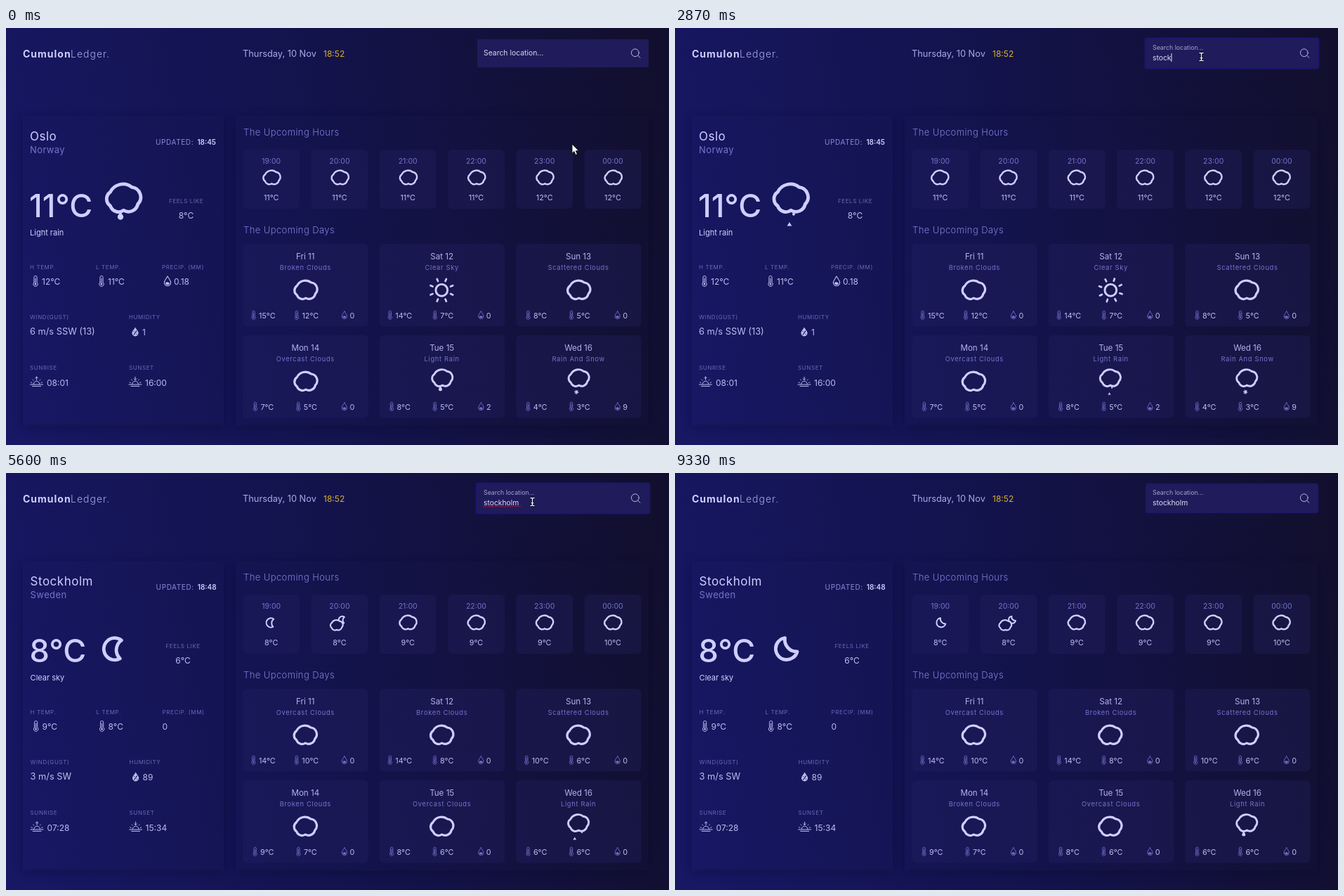
These frames come from a looping animation (944 px wide and 593 px high, 9.39 s). An HTML page:

```html
<!DOCTYPE html>
<html lang="en">
<head>
<meta charset="utf-8">
<title>Weather dashboard</title>
<style>
html, body { margin: 0; width: 100%; height: 100%; overflow: hidden; background: #13134c; }
svg { display: block; width: 944px; height: 593px; font-family: Inter, "Open Sans", sans-serif; }
text { white-space: pre; }
.ln { fill: none; stroke-linecap: round; stroke-linejoin: round; }
</style>
</head>
<body>
<svg id="stage" viewBox="0 0 944 593">
  <defs>
    <linearGradient id="bg" gradientUnits="userSpaceOnUse" x1="0" y1="350" x2="944" y2="190">
      <stop offset="0" stop-color="#171763"/>
      <stop offset=".5" stop-color="#13134c"/>
      <stop offset="1" stop-color="#120f2e"/>
    </linearGradient>
    <filter id="soft" x="-10%" y="-10%" width="120%" height="120%"><feGaussianBlur stdDeviation="8"/></filter>
    <filter id="glow" x="-5%" y="-20%" width="110%" height="140%"><feGaussianBlur stdDeviation=".7"/></filter>
    <clipPath id="fall"><rect x="-30" y="-30" width="60" height="56"/></clipPath>
  </defs>
</svg>
<script>
const LOOP = 9390, SWAP = 4300;
const BRIGHT = '#cfceff', VALUE = '#bdbcf0', MUTED = '#7572cd', LABEL = '#6a68ba';
const CLOUD = 'M-12.6-6.2A13.5 13.5 0 0 1 7.8-10.8A9.5 9.5 0 0 1 13.5 5.3A9 9 0 0 1 0 11.2A8.3 8.3 0 0 1-12.6 7A8 8 0 0 1-12.6-6.2Z';
const MOON = 'M-2-15.5A15.6 15.6 0 1 0 15.5 4A17 17 0 0 1-2-15.5Z';
const DROP = 'M0-8C1-5.5 2.8-4 2.8-2.6A2.8 2.8 0 0 1-2.8-2.6C-2.8-4-1-5.5 0-8Z';
const root = document.getElementById('stage');
const anims = [];

const clamp = v => Math.max(0, Math.min(1, v));
const ease = v => { v = clamp(v); return v * v * (3 - 2 * v); };
const mix = (a, b, k) => a + (b - a) * k;
const frac = v => v - Math.floor(v);
const put = (node, attrs) => { for (const k in attrs) node.setAttribute(k, attrs[k]); };

function el(tag, attrs, parent = root) {
  const node = document.createElementNS('http://www.w3.org/2000/svg', tag);
  put(node, attrs);
  parent.appendChild(node);
  return node;
}
function label(parent, x, y, str, size, fill, more = {}) {
  const node = el('text', { x, y, 'font-size': size, fill, ...more }, parent);
  node.textContent = str;
  return node;
}
const group = (parent, x, y, s = 1) => el('g', { transform: `translate(${x} ${y}) scale(${s})` }, parent);
const line = (parent, d, stroke, w, more = {}) =>
  el('path', { d, class: 'ln', stroke, 'stroke-width': w, ...more }, parent);
const MID = { 'text-anchor': 'middle' };

// Small fixed icons
function thermo(parent, x, y, s, color) {
  const g = group(parent, x, y, s);
  line(g, 'M-2.1 1.8V-5.4A2.1 2.1 0 0 1 2.1-5.4V1.8A3.2 3.2 0 1 1-2.1 1.8Z', color, 1);
  line(g, 'M0-4V4', color, 1.1);
  el('circle', { cy: 4.2, r: 1.3, fill: color }, g);
}
function water(parent, x, y, s, color) {
  const g = group(parent, x, y, s);
  line(g, 'M0-6.6C1.5-3.6 4.4-1 4.4 2A4.4 4.4 0 0 1-4.4 2C-4.4-1-1.5-3.6 0-6.6Z', color, 1.1);
  el('path', { d: 'M-2.8 2Q0 0 2.8 2.6A2.8 2.8 0 0 1-2.8 2Z', fill: color }, g);
}
function humid(parent, x, y) {
  const g = group(parent, x, y);
  el('path', { d: 'M0-6.5C1.4-3.6 4.6-1 4.6 1.8A4.6 4.6 0 0 1-4.6 1.8C-4.6-1-1.4-3.6 0-6.5Z', fill: VALUE }, g);
  line(g, 'M1.8-1.2L-1.8 4M-1.9-.4h.1M1.9 3.2h.1', '#171757', 1.2);
}
function horizon(parent, x, y, dir) {
  const g = group(parent, x, y);
  line(g, 'M-9 4H9M-6 6.4H6M-4.4 3.6A4.4 4.4 0 0 1 4.4 3.6M-8 .8L-6.6 1.4M8 .8L6.6 1.4M-5.4-3L-4.4-2M5.4-3L4.4-2M0-6.8V-2.6', VALUE, 1);
  line(g, dir > 0 ? 'M-1.8-5.2L0-7L1.8-5.2' : 'M-1.8-4.2L0-2.4L1.8-4.2', VALUE, 1);
}

// Moving weather icons; each takes a parent, centre, scale and city index
const sway = (t, city) => .95 * Math.cos(2 * Math.PI * (t - city * 6470) / 4470);

function cloud(parent, x, y, s, city, fill = 'none', w = 3.2) {
  const g = group(parent, x, y, s);
  const path = line(g, CLOUD, BRIGHT, w, { style: `fill:${fill}` });
  anims.push(t => put(path, { transform: `translate(${sway(t, city)} 0)` }));
  return g;
}
function rain(parent, x, y, s, city) {
  const g = cloud(parent, x, y, s, city);
  const wrap = el('g', { 'clip-path': 'url(#fall)' }, g);
  const xs = city ? [-5.5, 6] : [2, -2];
  xs.forEach((dx, i) => {
    const drop = el('path', { d: DROP, fill: BRIGHT }, wrap);
    anims.push(t => {
      const p = frac((city ? .65 + (t - 6470) / 658 : .48 + t / 658) + (i ? 0 : .5));
      const k = clamp((p - .24) / .22);
      put(drop, { transform: `translate(${dx} ${6.5 + 28 * p}) scale(${k})` });
    });
  });
}
function snow(parent, x, y, s, city) {
  const g = cloud(parent, x, y, s, city);
  const wrap = el('g', { 'clip-path': 'url(#fall)' }, g);
  [-2.8, 4].forEach((dx, i) => {
    const flake = line(wrap, 'M-2.8 0H2.8M-1.4-2.4L1.4 2.4M1.4-2.4L-1.4 2.4', BRIGHT, 1.5);
    anims.push(t => {
      const p = frac(.75 + t / 2900 + i / 2);
      put(flake, { transform: `translate(${dx} ${9 + 17.3 * p}) rotate(${p * 180}) scale(${clamp((p - .2) / .25)})` });
    });
  });
}
function sun(parent, x, y, s) {
  const g = group(parent, x, y, s);
  el('circle', { r: 8.4, class: 'ln', stroke: BRIGHT, 'stroke-width': 2.9 }, g);
  const rays = el('g', {}, g);
  for (let i = 0; i < 8; i++) line(rays, 'M13.8 0H17.2', BRIGHT, 2.7, { transform: `rotate(${22.5 + 45 * i})` });
  anims.push(t => put(rays, { transform: `rotate(${t * .03})` }));
}
function moon(parent, x, y, s, city, w = 4.8) {
  const path = line(group(parent, x, y, s), MOON, BRIGHT, w);
  anims.push(t => {
    const k = (9330 - t) / 4660;
    put(path, { transform: `translate(${2.5 - 5 * k} 0) rotate(${58 * k})` });
  });
}
function cloudMoon(parent, x, y, s, city) {
  moon(parent, x + 6.4, y - 4, .32, city, 6.4);
  cloud(parent, x - 2.2, y + 3.8, .55, city, '#17174f', 3.9);
}
const ICONS = { cloud, rain, snow, sun, moon, cloudMoon };

// Page frame
el('rect', { width: 944, height: 593, fill: 'url(#bg)' });
for (const [x, w] of [[24, 286], [327, 588]]) {
  el('rect', { x, y: 128, width: w, height: 438, fill: '#08082a', opacity: .38, filter: 'url(#soft)' });
  el('rect', { x, y: 125, width: w, height: 438, rx: 2, fill: 'url(#bg)' });
}
const card = (x, y, w, h) => el('rect', { x, y, width: w, height: h, rx: 6, fill: '#242260', opacity: .34 });
const hourX = i => 337.3 + 97.25 * i, dayX = i => 337.3 + 194.4 * i;
for (let i = 0; i < 6; i++) {
  card(hourX(i), 173, 81, 84);
  card(dayX(i % 3), i < 3 ? 307 : 437, 178.6, 117.5);
}
label(root, 24, 42, 'Cumulon', 14, BRIGHT, { 'font-weight': 700, 'letter-spacing': 1 });
label(root, 92, 42, 'Ledger.', 14, '#a9a7ea', { 'font-weight': 300, 'letter-spacing': 1 });
label(root, 337, 41.3, 'Thursday, 10 Nov', 12.8, '#aaa8ea');
label(root, 452, 41.3, '18:52', 12, '#d6b12d');
const HEAD = { 'font-weight': 300, 'letter-spacing': .4 };
label(root, 338, 153, 'The Upcoming Hours', 13, '#7f7cd9', HEAD);
label(root, 338, 292, 'The Upcoming Days', 13, '#7f7cd9', HEAD);

// City data
const cities = [
  {
    name: 'Oslo', land: 'Norway', at: '18:45', temp: '11°C', icon: ['rain', 166, 242.5, 1.5],
    feels: '8°C', feelX: 256.5, sky: 'Light rain', hi: '12°C', lo: '11°C', wet: '0.18',
    wind: '6 m/s SSW (13)', hum: '1', rise: '08:01', set: '16:00',
    hours: ['11°C cloud', '11°C cloud', '11°C cloud', '11°C cloud', '12°C cloud', '12°C cloud'],
    days: ['Broken Clouds|cloud|15|12|0', 'Clear Sky|sun|14|7|0', 'Scattered Clouds|cloud|8|5|0',
      'Overcast Clouds|cloud|7|5|0', 'Light Rain|rain|8|5|2', 'Rain And Snow|snow|4|3|9']
  },
  {
    name: 'Stockholm', land: 'Sweden', at: '18:48', temp: '8°C', icon: ['moon', 156, 250, 1],
    feels: '6°C', feelX: 251.5, sky: 'Clear sky', hi: '9°C', lo: '8°C', wet: '0',
    wind: '3 m/s SW', hum: '89', rise: '07:28', set: '15:34',
    hours: ['8°C moon', '8°C cloudMoon', '9°C cloud', '9°C cloud', '9°C cloud', '10°C cloud'],
    days: ['Overcast Clouds|cloud|14|10|0', 'Broken Clouds|cloud|14|8|0', 'Scattered Clouds|cloud|10|6|0',
      'Broken Clouds|cloud|9|7|0', 'Overcast Clouds|cloud|8|6|0', 'Light Rain|rain|6|6|0']
  }
];
const dayNames = ['Fri 11', 'Sat 12', 'Sun 13', 'Mon 14', 'Tue 15', 'Wed 16'];

// Icon and number, centred together on cx
function pair(parent, cx, y, str, icon) {
  const g = el('g', {}, parent);
  icon(g, 3.5, y - 4.4, .82, MUTED);
  const w = label(g, 11, y, str, 10.8, VALUE).getComputedTextLength();
  put(g, { transform: `translate(${cx - (11 + w) / 2} 0)` });
}
function buildCity(c, city) {
  const g = el('g', {});
  const left = group(g, city * .6, 0);
  const cap = (x, y, s, more) => label(left, x, y, s, 8, LABEL, { 'letter-spacing': .6, ...more });
  const val = (x, y, s, size = 12) => label(left, x, y, s, size, VALUE);
  label(left, 34, 160, c.name, 17, BRIGHT, { 'letter-spacing': .5 });
  label(left, 34, 178, c.land, 13, MUTED, { 'letter-spacing': .4 });
  label(left, 213, 165.5, 'UPDATED:', 10, '#8d8ad8', { 'letter-spacing': .6 });
  label(left, 299, 165.5, c.at, 10, BRIGHT, { 'font-weight': 600, 'text-anchor': 'end' });
  label(left, 33, 269, c.temp, 45, BRIGHT, { 'font-weight': 500 });
  cap(c.feelX, 249, 'FEELS LIKE', MID);
  label(left, c.feelX, 271, c.feels, 12, VALUE, MID);
  label(left, 34, 295, c.sky, 11, BRIGHT);
  cap(34, 343, 'H TEMP.');
  cap(128, 343, 'L TEMP.');
  cap(222, 343, 'PRECIP. (MM)');
  thermo(left, 42, 360, 1, VALUE);
  thermo(left, 136, 360, 1, VALUE);
  val(51, 365, c.hi);
  val(145, 365, c.lo);
  if (!city) water(left, 230, 360, 1.05, VALUE);
  val(city ? 222 : 239, 365, c.wet);
  cap(34, 414, 'WIND(GUST)');
  cap(175, 414, 'HUMIDITY');
  val(34, 436, c.wind, 12.8);
  humid(left, 184, 432);
  val(194, 436.5, c.hum);
  cap(34, 486, 'SUNRISE');
  cap(175, 486, 'SUNSET');
  horizon(left, 43.5, 503, 1);
  horizon(left, 184, 503, -1);
  val(58, 509, c.rise);
  val(198, 509, c.set);
  ICONS[c.icon[0]](g, ...c.icon.slice(1), city);

  c.hours.forEach((h, i) => {
    const [temp, icon] = h.split(' '), x = hourX(i) + 40.4;
    label(g, x, 192.6, (i < 5 ? 19 + i : '00') + ':00', 10.5, MUTED, MID);
    ICONS[icon](g, x - (icon == 'cloudMoon' ? 2.2 : 0), 212.8, icon == 'moon' ? .42 : .75, city);
    label(g, x, 245, temp, 10.8, VALUE, MID);
  });
  c.days.forEach((d, i) => {
    const [sky, icon, hi, lo, wet] = d.split('|');
    const x0 = dayX(i % 3), x = x0 + 89, y = i < 3 ? 0 : 130;
    label(g, x, 328.7 + y, dayNames[i], 11.6, '#b3b1ee', MID);
    label(g, x, 343.8 + y, sky, 9.3, MUTED, { 'letter-spacing': .7, ...MID });
    const small = icon == 'rain' || icon == 'snow';
    ICONS[icon](g, x - .4, (small ? 368 : 372.8) + y, small ? .9 : 1, city);
    pair(g, x0 + 29, 412.7 + y, hi + '°C', thermo);
    pair(g, x0 + 90.5, 412.7 + y, lo + '°C', thermo);
    pair(g, x0 + 150, 412.7 + y, wet, water);
  });
  return g;
}
const views = cities.map(buildCity);

// Search field
const ring = el('rect', { rx: 4, fill: '#1d1874', filter: 'url(#glow)' });
el('rect', { x: 671, y: 16, width: 244, height: 40, rx: 2, fill: '#201b5a' });
const hint = label(root, 680, 39, 'Search location...', 10.4, '#d8d6f2');
const typed = label(root, 680, 46, '', 10.3, '#dddcf6');
const caret = el('rect', { y: 36, width: 1, height: 12, fill: '#e6e5fa' });
const squiggle = line(root, 'M680 47.6H733', '#b81c3c', 1.1, { 'stroke-dasharray': '.6 1.8' });
el('circle', { cx: 895.8, cy: 35.2, r: 5.4, class: 'ln', stroke: '#bcb9e2', 'stroke-width': 1 });
line(root, 'M899.8 39.2L902.8 42.2', '#bcb9e2', 1);

// Pointer
const arrow = el('path', { d: 'M0 0V13.2L3 10.5L5 15.4L7.4 14.4L5.4 9.7H9.4Z', fill: '#fff', stroke: '#111', 'stroke-width': .9 });
const beam = el('g', {});
const BEAM = 'M-2.6-5.6Q0-5.6 0-4Q0-5.6 2.6-5.6M0-4.5V4.5M-2.6 5.6Q0 5.6 0 4Q0 5.6 2.6 5.6M-1.4 1.6H1.4';
line(beam, BEAM, '#0b0b20', 2.8);
line(beam, BEAM, '#fff', 1.2);
const route = [[0, 806, 165], [150, 806, 165], [850, 749.5, 41], [7810, 749.5, 41],
  [8030, 886, 43], [8350, 931, 130], [8930, 929, 540]];

function pointer(t) {
  let i = 0;
  while (i < route.length - 2 && t > route[i + 1][0]) i++;
  const [t0, x0, y0] = route[i], [t1, x1, y1] = route[i + 1], k = ease((t - t0) / (t1 - t0));
  return [mix(x0, x1, k), mix(y0, y1, k)];
}
const show = (node, on) => put(node, { visibility: on ? 'visible' : 'hidden' });

function draw(t) {
  const city = t < SWAP ? 0 : 1;
  views.forEach((v, i) => put(v, { display: i == city ? 'inline' : 'none' }));
  anims.forEach(f => f(t));

  const lift = ease((t - 880) / 330);
  const focus = lift * (1 - ease((t - 9170) / 320));
  const out = 2.4 * focus;
  put(ring, { x: 671 - out, y: 16 - out, width: 244 + 2 * out, height: 40 + 2 * out, opacity: focus > 0 ? .9 : 0 });
  put(hint, {
    y: mix(39, 30.6, lift), 'font-size': mix(10.4, 8.8, lift),
    fill: `rgb(${mix(216, 166, lift)},${mix(214, 163, lift)},${mix(242, 206, lift)})`
  });

  const count = Math.max(0, Math.min(9, Math.floor((t - 2030) / 160)));
  typed.textContent = 'stockholm'.slice(0, count);
  const active = t > 900 && t < 9170, typing = t > 2190 && t < 3670;
  const blink = typing || frac((t - 3670) / 1060) < .5;
  show(caret, active && blink);
  put(caret, { x: 680 + (count ? typed.getComputedTextLength() : 0) });
  show(squiggle, t > 5150 && t < 9170);

  const [x, y] = pointer(t), inField = x > 671 && x < 915 && y > 16 && y < 56;
  const at = { transform: `translate(${x} ${y})` };
  put(arrow, at);
  put(beam, at);
  show(arrow, !inField && t < 8960);
  show(beam, inField && t < 8960);
}
const start = performance.now();
function tick() {
  draw((performance.now() - start) % LOOP);
  requestAnimationFrame(tick);
}
tick();
</script>
</body>
</html>
```
